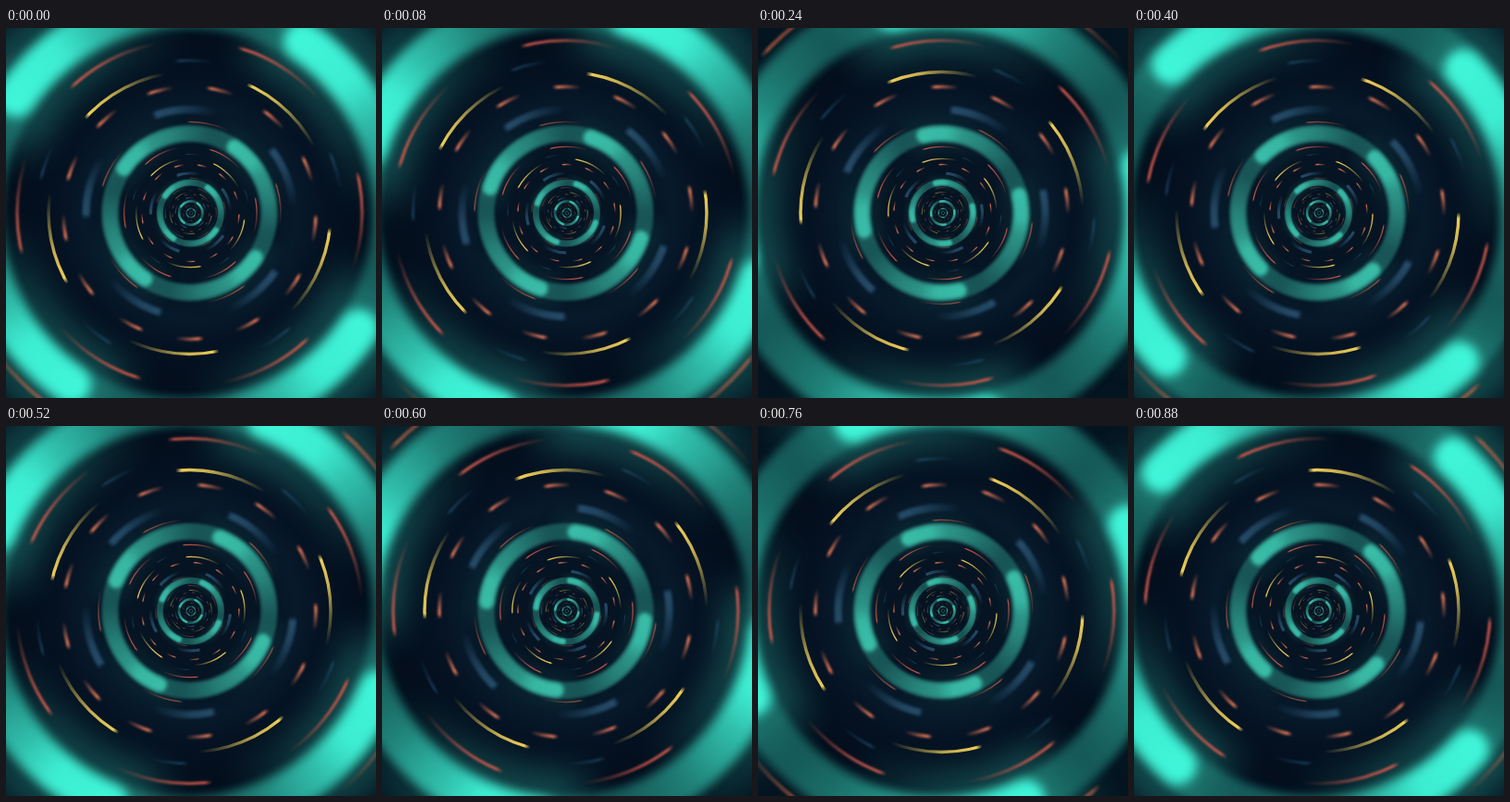
An HTML page with a canvas for the animation above (920 ms loop, 400 by 400 pixels).

```html
<!DOCTYPE html>
<html>
<head>
<meta charset="utf-8">
<style>
  html, body { margin: 0; width: 100%; height: 100%; overflow: hidden; background: #030a19; }
  canvas { display: block; }
</style>
</head>
<body>
<canvas width="400" height="400"></canvas>
<script>
const ctx = document.querySelector('canvas').getContext('2d');
const LOOP = 920, STEP = 40, RATIO = 2.6, TAU = Math.PI * 2;
const rad = degrees => degrees * Math.PI / 180;

// Each ring: radius, width, arcs, arc length and phase in degrees, turn per loop, rgb, opacity, blur
const RINGS = [
  { r: 98.5, w: 1.7, n: 5, len: 28, phase: -92, turn: 180, rgb: '195,100,72', a: 0.65, blur: 0.5 },
  { r: 112, w: 8, n: 5, len: 36, phase: -39, turn: 180, rgb: '48,92,124', a: 0.75, blur: 1.8 },
  { r: 136.5, w: 3.6, n: 13, len: 13, phase: 0.5, turn: 155, rgb: '222,116,84', a: 0.95, blur: 0.8 },
  { r: 152.5, w: 3.4, n: 5, len: 38, phase: -66, turn: 180, rgb: '236,204,88', a: 1, blur: 0.7 },
  { r: 165, w: 3, n: 5, len: 15, phase: -24, turn: 180, rgb: '34,78,108', a: 0.65, blur: 0.9 },
  { r: 186.5, w: 3.2, n: 6, len: 33, phase: 46, turn: 360, rgb: '206,88,76', a: 0.95, blur: 0.8 }
];

function arc(r, w, style, blur, from = 0, to = 360) {
  ctx.filter = blur > 0.25 ? `blur(${blur}px)` : 'none';
  ctx.lineWidth = w;
  ctx.strokeStyle = style;
  ctx.beginPath();
  ctx.arc(0, 0, r, rad(from), rad(to));
  ctx.stroke();
}

// Repeats the [degree, colour] stops n times around the centre
function sweep(n, degrees, stops) {
  const g = ctx.createConicGradient(rad(degrees), 0, 0);
  for (let i = 0; i < n; i++)
    for (const [deg, colour] of stops) g.addColorStop(Math.min(1, i / n + deg / 360), colour);
  return g;
}

function tealRing(s, p) {
  const main = s > 1;
  const tint = a => main ? `rgba(66,255,224,${a})` : `rgba(60,196,174,${a})`;
  const head = -56 - 180 * p;
  const fade = sweep(4, head - 8, [[0, tint(1)], [25, tint(0.92)], [36, tint(0.6)],
    [54, tint(main ? 0.28 : 0.42)], [80, tint(0.04)], [90, tint(0)]]);
  const halo = sweep(4, head - 20, [[0, tint(0)], [15, tint(1)], [45, tint(0.8)], [75, tint(0)], [90, tint(0)]]);

  ctx.globalAlpha = main ? 0.24 : 0.08;
  arc(86 * s, 40 * s, halo, 6 * s);
  ctx.globalAlpha = main ? 0.25 : 0.34;
  arc(86 * s, 18 * s, tint(1), 1.8 * s);
  ctx.globalAlpha = 0.95;
  ctx.lineCap = 'round';
  for (let i = 0; i < 4; i++)
    arc(86 * s, 16 * s, fade, 2.2 * s, head + 90 * i, head + 90 * i + 72);
  ctx.lineCap = 'butt';
}

function arcRing(ring, s, p) {
  const { r, w, n, len, phase, turn, rgb, a, blur } = ring;
  const tint = k => `rgba(${rgb},${k})`;
  const stops = [[0, tint(0)], [2.5, tint(1)], [len * 0.35, tint(0.85)], [len * 0.65, tint(0.45)],
    [len, tint(0)], [360 / n, tint(0)]];
  ctx.globalAlpha = a;
  arc(r * s, w * s, sweep(n, phase - turn * p, stops), blur * s);
}

function background() {
  const g = ctx.createRadialGradient(200, 200, 0, 200, 200, 284);
  g.addColorStop(0, '#061220');
  g.addColorStop(0.32, '#061524');
  g.addColorStop(0.4, '#071a2b');
  g.addColorStop(0.5, '#051222');
  g.addColorStop(0.65, '#040e1c');
  g.addColorStop(0.8, '#04141f');
  g.addColorStop(1, '#041420');
  ctx.filter = 'none';
  ctx.globalAlpha = 1;
  ctx.fillStyle = g;
  ctx.fillRect(0, 0, 400, 400);
}

function draw(p) {
  background();
  for (let level = 1; level > -5; level--) {
    const s = RATIO ** level;
    ctx.save();
    ctx.translate(200 - 1.5 * s, 200);
    tealRing(s, p);
    for (const ring of RINGS)
      if (ring.r * s < 280) arcRing(ring, s, p);
    ctx.restore();
  }
}

function frame() {
  const t = performance.now() % LOOP;
  draw(Math.floor(t / STEP) * STEP / LOOP);
  requestAnimationFrame(frame);
}
frame();
</script>
</body>
</html>
```
